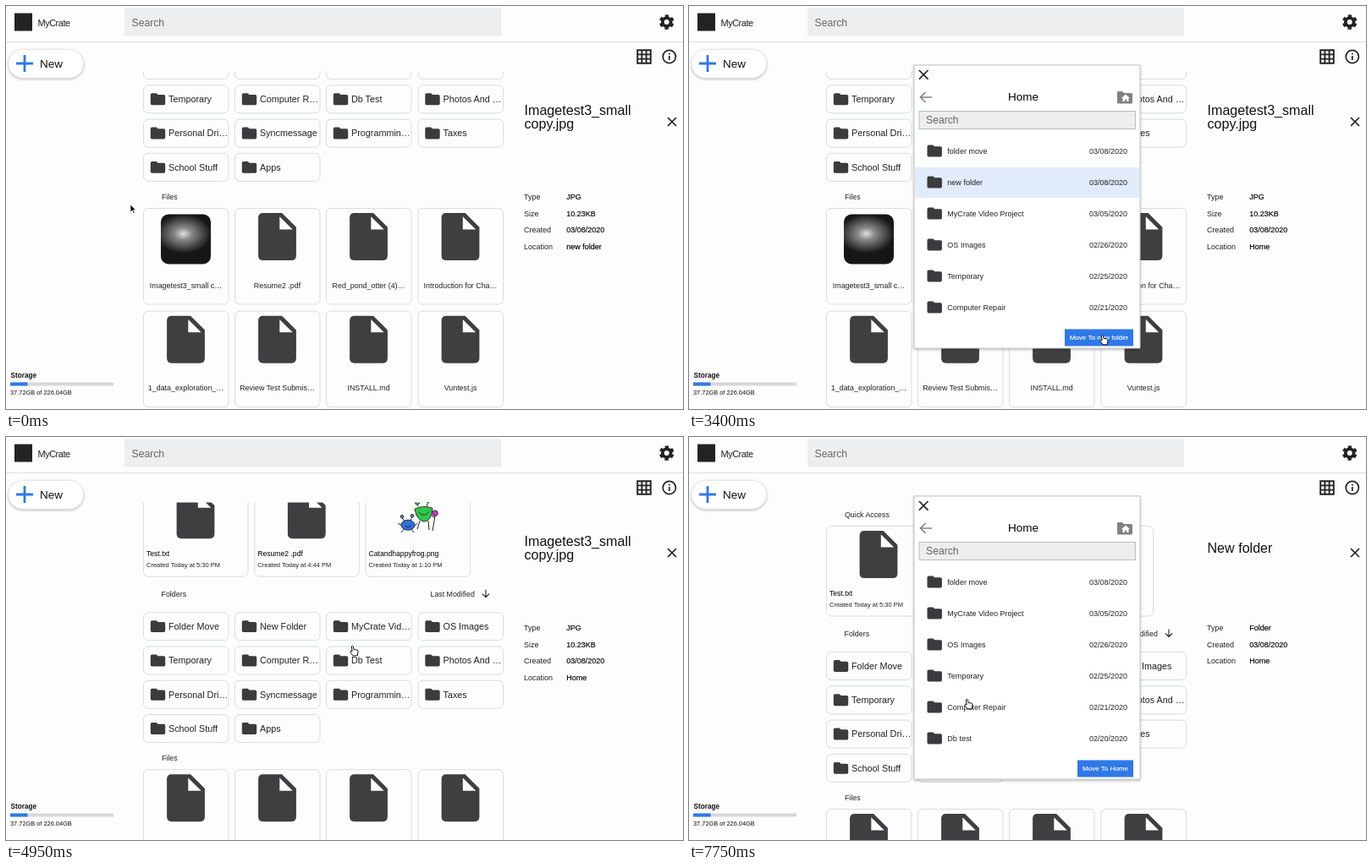
Animation, 800 px wide and 477 px high, one loop 8000 ms. Source, as an HTML page:

```html
<!DOCTYPE html>
<html lang="en">
<head>
<meta charset="utf-8">
<title>File manager</title>
<style>
  html, body { margin: 0; width: 100%; height: 100%; overflow: hidden; background: #fdfdfd; }
  svg { display: block; width: 100vw; height: 100vh; }
  text { font-family: "Liberation Sans", Arial, sans-serif; white-space: pre; }
  .line { fill: none; stroke: #222; stroke-width: 1.7; }
  .card { fill: #fdfdfd; stroke: #dadcdd; }
</style>
</head>
<body>
<svg id="stage" viewBox="0 0 800 477">
  <defs>
    <path id="folder" fill="#3b3b3d" transform="scale(.87) translate(-2 -4)"
      d="M10 4H4Q2 4 2 6V18Q2 20 4 20H20Q22 20 22 18V8Q22 6 20 6H12Z"/>
    <path id="file" fill="#3f3f41" fill-rule="evenodd" transform="scale(2.8) translate(-12 -2)"
      d="M6 2Q4 2 4 4V20Q4 22 6 22H18Q20 22 20 20V8L14 2ZM13 9V3.5L18.5 9Z"/>
    <radialGradient id="glow" cx=".45" cy=".56" r=".56" gradientTransform="scale(1 .7)">
      <stop offset="0" stop-color="#e0e0e0"/><stop offset=".3" stop-color="#8a8a8a"/>
      <stop offset=".7" stop-color="#484848"/><stop offset="1" stop-color="#161616"/>
    </radialGradient>
    <filter id="shadow" x="-20%" y="-20%" width="140%" height="150%">
      <feDropShadow dx="0" dy="1.2" stdDeviation="1.4" flood-opacity=".3"/>
    </filter>
    <clipPath id="view"><rect x="150" y="77.5" width="450" height="400"/></clipPath>
  </defs>
</svg>
<script>
const LOOP = 8000;
const SCROLL = 201;
const BLUE = '#2f78e8';
const COLUMNS = [162.5, 270.5, 378.5, 487];

const text = (x, y, size, value, attrs = '') =>
  `<text x="${x}" y="${y}" font-size="${size}" fill="#222" ${attrs}>${value}</text>`;
const rect = (x, y, w, h, attrs = '') =>
  `<rect x="${x}" y="${y}" width="${w}" height="${h}" ${attrs}/>`;
const path = (d, attrs = '') => `<path class="line" d="${d}" ${attrs}/>`;
const use = (id, x, y) => `<use href="#${id}" x="${x}" y="${y}"/>`;
const group = (id, body, attrs = '') => `<g id="${id}" ${attrs}>${body}</g>`;
const cross = (x, y, r) => path(`M${x - r} ${y - r}l${2 * r} ${2 * r}m0 ${-2 * r}l${-2 * r} ${2 * r}`);
const middle = 'text-anchor="middle"';

const folders = ['Folder Move', 'New Folder', 'MyCrate Vid…', 'OS Images',
  'Temporary', 'Computer R…', 'Db Test', 'Photos And …',
  'Personal Dri…', 'Syncmessage', 'Programmin…', 'Taxes', 'School Stuff', 'Apps'];
const files = ['Imagetest3_small c…', 'Resume2 .pdf', 'Red_pond_otter (4)…', 'Introduction for Cha…',
  '1_data_exploration_…', 'Review Test Submis…', 'INSTALL.md', 'Vuntest.js'];
const moveTargets = [['folder move', '03/08/2020'], ['new folder', '03/08/2020'],
  ['MyCrate Video Project', '03/05/2020'], ['OS Images', '02/26/2020'], ['Temporary', '02/25/2020'],
  ['Computer Repair', '02/21/2020'], ['Db test', '02/20/2020']];

function folderCard(name, i, selected) {
  const x = COLUMNS[i % 4], y = 254.5 + 40.3 * Math.floor(i / 4);
  const [fill, color] = selected ? ['#e1ebfa', '#2c69c9'] : ['#fdfdfd', '#222'];
  return rect(x, y, 100.5, 33, `rx="5.5" class="card" style="fill:${fill}"`) +
    use('folder', x + 8.3, y + 9.5) +
    text(x + 29.5, y + 20.3, 10.8, name, `style="fill:${color}"`);
}

function fileCard(name, i) {
  const x = COLUMNS[i % 4], y = 440.5 + 121.7 * Math.floor(i / 4), center = x + 50;
  const icon = name.startsWith('Image')
    ? rect(x + 20.5, y + 7, 59, 59, 'rx="9" fill="url(#glow)"') : use('file', center, y + 5.5);
  return rect(x, y, 100.5, 113.5, 'rx="5.5" class="card"') + icon +
    text(center, y + 94, 8.9, name, middle);
}

const doodle = `<g stroke="#222" stroke-width=".9">
  ${path('M487 129L485 124M497 129L499 123M489 146L486 156M499 146L500 157M504 158L507 140M501 138L507 143M471 147L468 142M478 146L480 141M467 151L463 149M483 152L486 149M470 156L467 160M479 156L482 160', 'style="stroke-width:1"')}
  <path fill="#2fc84b" d="M483 132Q493 127 504 131Q503 146 494 147Q485 145 483 132Z"/>
  <ellipse cx="475" cy="151" rx="8" ry="6" fill="#2d72dc"/>
  <circle cx="507" cy="137" r="3.3" fill="#df28c8"/>
  <g fill="#3bce55"><circle cx="486" cy="124" r="2.6"/><circle cx="499" cy="122" r="2.6"/></g>
  <g fill="#4d87df"><circle cx="468" cy="141" r="1.8"/><circle cx="480" cy="140" r="1.8"/></g>
  <path fill="none" d="M488 136Q494 143 500 135M471 152Q475 155 479 152"/></g>`;

const quickAccess = [['Test.txt', '5:30'], ['Resume2 .pdf', '4:44'], ['Catandhappyfrog.png', '1:10']]
  .map(([name, time], i) => {
    const x = 162.5 + 131.3 * i;
    return rect(x, 105.5, 123.5, 106.5, 'rx="5.5" class="card"') +
      (i < 2 ? use('file', x + 61.5, 111) : doodle) +
      text(x + 3.5, 187.5, 8.6, name, 'style="fill:#000"') +
      text(x + 3.5, 200.5, 7.5, `Created Today at ${time} PM`);
  }).join('');

const content = group('content',
  text(184, 95, 8.8, 'Quick Access') + quickAccess +
  text(183.5, 236, 8.9, 'Folders') + text(501.5, 236, 8.8, 'Last Modified') +
  path('M567 227.5v9m-4-4l4 4l4-4', 'style="stroke-width:1.1"') +
  folders.map((name, i) => folderCard(name, i)).join('') +
  group('selected', folderCard('New Folder', 1, true)) +
  text(184, 430, 8.8, 'Files') +
  group('filesBefore', files.map(fileCard).join('')) +
  group('filesAfter', files.slice(1).map(fileCard).join('')));

const chrome =
  rect(0, 42, 800, 1, 'fill="#dedede"') +
  rect(10, 8.5, 21, 21, 'fill="#242223"') +
  text(37.5, 24, 11, 'MyCrate', 'letter-spacing="-.5"') +
  rect(140, 2.5, 445, 33, 'fill="#eceef0"') + text(148.5, 23.5, 12.2, 'Search', 'style="fill:#666"') +
  `<g fill="none" stroke="#222"><circle cx="780.7" cy="19" r="4.9" stroke-width="3.8"/>
   <circle cx="780.7" cy="19" r="7.3" stroke-width="3" stroke-dasharray="4.2 3.445" stroke-dashoffset="5.92"/></g>` +
  rect(3, 51.5, 88.5, 33.5, 'rx="16.7" fill="#fff" stroke="#e2e2e2" stroke-width=".7" filter="url(#shadow)"') +
  path('M22 58v20M12 68h20', `style="stroke:${BLUE};stroke-width:2.8"`) +
  text(40, 73, 13.5, 'New', 'style="fill:#111"') +
  path('M746.2 52.2h15.6v15.6h-15.6zM751.4 52v16M756.6 52v16M746 57.4h16M746 62.6h16', 'style="stroke-width:1.9"') +
  '<circle class="line" cx="783.8" cy="60" r="7.6"/>' + path('M783.8 59v5M783.8 55.7v1.7') +
  text(5.5, 439.5, 8.2, 'Storage', 'font-weight="bold" style="fill:#111"') +
  rect(5, 445.5, 122, 4, 'fill="#d8d8d8"') + rect(5, 445.5, 20.5, 4, `fill="${BLUE}"`) +
  text(5, 460, 7.4, '37.72GB of 226.04GB', 'style="fill:#111"');

const heading = (y, value) => text(612.5, y, 16.1, value, 'style="fill:#111"');
const details = rows => rows.map(([label, value, id = ''], i) =>
  text(612, 229.3 + 19.4 * i, 9, label) +
  text(662.3, 229.3 + 19.4 * i, 9, value, `id="${id}" style="fill:#000;stroke:#000;stroke-width:.15"`)).join('');
const panels = cross(787, 137, 5) +
  group('filePanel', heading(129, 'Imagetest3_small') + heading(145, 'copy.jpg') +
    details([['Type', 'JPG'], ['Size', '10.23KB'], ['Created', '03/08/2020'], ['Location', 'Home', 'place']])) +
  group('folderPanel', heading(137, 'New folder') +
    details([['Type', 'Folder'], ['Created', '03/08/2020'], ['Location', 'Home']]));

const dots = [[13, 3], [3, 8], [13, 13]]
  .map(([x, y]) => `<circle cx="${x}" cy="${y}" r="2.6" fill="#222" stroke="none"/>`).join('');
const menuItems = [
  ['Rename', path('M8 15H2V1H9L13 5V7M9 1V5H13') + path('M9 14L15 8', 'style="stroke-width:2.6"')],
  ['Share', path('M13 3L3 8L13 13') + dots],
  ['Download', path('M6.5 1V6H4L8 10L12 6H9.5V1Z', 'style="fill:#222"') + path('M1 10.5V15H15V10.5')],
  ['Move', path('M1 3H6L8 5H15V14H1ZM4 9.5H11M8.5 7L11 9.5L8.5 12')],
  ['Delete', path('M1 3H15M5 3V1H11V3M3 3V15H13V3M6 6V12M8 6V12M10 6V12')],
];
const menu = group('menu',
  rect(.5, .5, 154, 138.5, 'rx="4" fill="#fff" stroke="#cfcfcf" filter="url(#shadow)"') +
  rect(1, 0, 153, 27.5, 'id="hover" fill="#c5c5c5"') +
  menuItems.map(([label, icon], i) =>
    `<g transform="translate(8 ${7.5 + 27.5 * i})">${icon}</g>` +
    text(30.5, 19 + 27.5 * i, 8.8, label, 'style="fill:#111"')).join(''));

const button = (x, label) => rect(x, 382.5, 525 - x, 20, `fill="${BLUE}"`) +
  text((x + 525) / 2, 395.3, 8.05, label, `${middle} style="fill:#fff;stroke:#fff;stroke-width:.15"`);
const targetRows = rows => rows.map(([name, date], i) => {
  const y = 171.5 + 37 * i;
  return use('folder', 281.5, y - 7) + text(305.3, y + 3.3, 9.05, name) +
    text(518, y + 3.3, 9, date, 'text-anchor="end"');
}).join('');
const dialog = group('dialog',
  rect(266, 70, 267, 335, 'fill="#fff" stroke="#c4c4c4" filter="url(#shadow)"') +
  cross(277.2, 81.3, 5.3) +
  path('M287 108H274M279.5 102L273.5 108L279.5 114', 'style="stroke:#858585"') +
  text(395, 112.3, 13.5, 'Home', `${middle} style="fill:#000"`) +
  '<path fill="#818181" d="M506 102Q506 101 507 101H512L514 103H522.5Q524 103 524 104.5V114Q524 115.5 522.5 115.5H507.5Q506 115.5 506 114Z"/>' +
  '<path fill="#fff" d="M516 104.5L521 109H519.5V113H517V110.5H515V113H512.5V109H511Z"/>' +
  rect(272, 124.5, 255.5, 21, 'fill="#eceef0" stroke="#b9bdc0"') +
  text(280, 139.3, 12.2, 'Search', 'style="fill:#666"') +
  rect(267, 191, 265, 36, 'id="targetHover" fill="#e1ebfa"') +
  group('targetsBefore', targetRows(moveTargets.slice(0, 6))) +
  group('targetsAfter', targetRows(moveTargets.filter((_, i) => i !== 1))) +
  group('moveHome', button(459, 'Move To Home')) +
  group('moveFolder', button(444, 'Move To new folder')));

const cursor = group('cursor',
  '<path id="arrow" fill="#111" stroke="#fff" stroke-width=".6" d="M0 0V9L2.1 7.1L3.8 10.5L5.1 9.9L3.5 6.6H6.4Z"/>' +
  `<path id="hand" fill="#fff" stroke="#111" stroke-width="1" stroke-linejoin="round"
    d="M-.7 1Q.4 -.4 1.4 1L2 4.5L5.8 5Q7.2 5.4 7 7L6.3 11.8H1L-2 7.6Q-2.4 6 -.8 6.2L.1 7Z"/>`);

document.getElementById('stage').insertAdjacentHTML('beforeend',
  chrome + `<g clip-path="url(#view)">${content}</g>` + panels + menu + dialog + cursor);

const nodes = Object.fromEntries([...document.querySelectorAll('[id]')].map(n => [n.id, n]));
const show = (id, visible) => nodes[id].setAttribute('display', visible ? 'inline' : 'none');
const move = (id, x, y) => nodes[id].setAttribute('transform', `translate(${x} ${y})`);

// time, x, y of the pointer tip
const pointerPath = [
  [0, 147, 235], [25, 147, 235], [100, 229, 291], [800, 229, 291], [850, 176, 283], [1100, 181, 309],
  [1200, 181, 309], [1700, 488, 384], [1850, 488, 384], [2300, 315, 213], [2700, 315, 213],
  [3250, 488, 389], [4200, 488, 389], [4350, 409, 247], [5000, 409, 247], [5400, 312, 265],
  [5420, 312, 265], [5550, 312, 268], [6720, 312, 268], [7000, 322, 307], [7350, 321, 288],
  [7550, 321, 288], [7750, 328, 310], [LOOP, 328, 310],
];

function pointerAt(t) {
  const i = pointerPath.findIndex(key => key[0] > t);
  const [t0, x0, y0] = pointerPath[i - 1], [t1, x1, y1] = pointerPath[i];
  const p = (t - t0) / (t1 - t0), eased = p * p * (3 - 2 * p);
  return [x0 + (x1 - x0) * eased, y0 + (y1 - y0) * eased];
}

function render(t) {
  const within = (from, to) => t >= from && t < to;
  const [x, y] = pointerAt(t);
  move('cursor', x, y);
  show('arrow', t < 100);
  show('hand', t >= 100);

  const p = Math.min(1, Math.max(0, (t - 4580) / 717));
  move('content', 0, -SCROLL * (1 - p) ** 2);
  show('filesBefore', t < 3900);
  show('filesAfter', t >= 3900);
  show('selected', t >= 5800);

  nodes.place.textContent = t < 450 ? 'new folder' : 'Home';
  show('filePanel', t < 6000);
  show('folderPanel', t >= 6000);

  const menuY = t < 4000 ? 214 : 190;
  show('menu', within(450, 1200) || within(6050, 7600));
  move('menu', t < 4000 ? 162 : 270, menuY);
  const row = Math.floor((y - menuY - 1.5) / 27.5);
  nodes.hover.setAttribute('y', 1.5 + 27.5 * row);

  const picked = within(2550, 3500);
  show('dialog', within(1200, 3500) || t >= 7600);
  show('targetHover', picked);
  show('moveFolder', picked);
  show('moveHome', !picked);
  show('targetsBefore', t < 4000);
  show('targetsAfter', t >= 4000);
}

const start = performance.now();
function tick() {
  render((performance.now() - start) % LOOP);
  requestAnimationFrame(tick);
}
tick();
</script>
</body>
</html>
```
